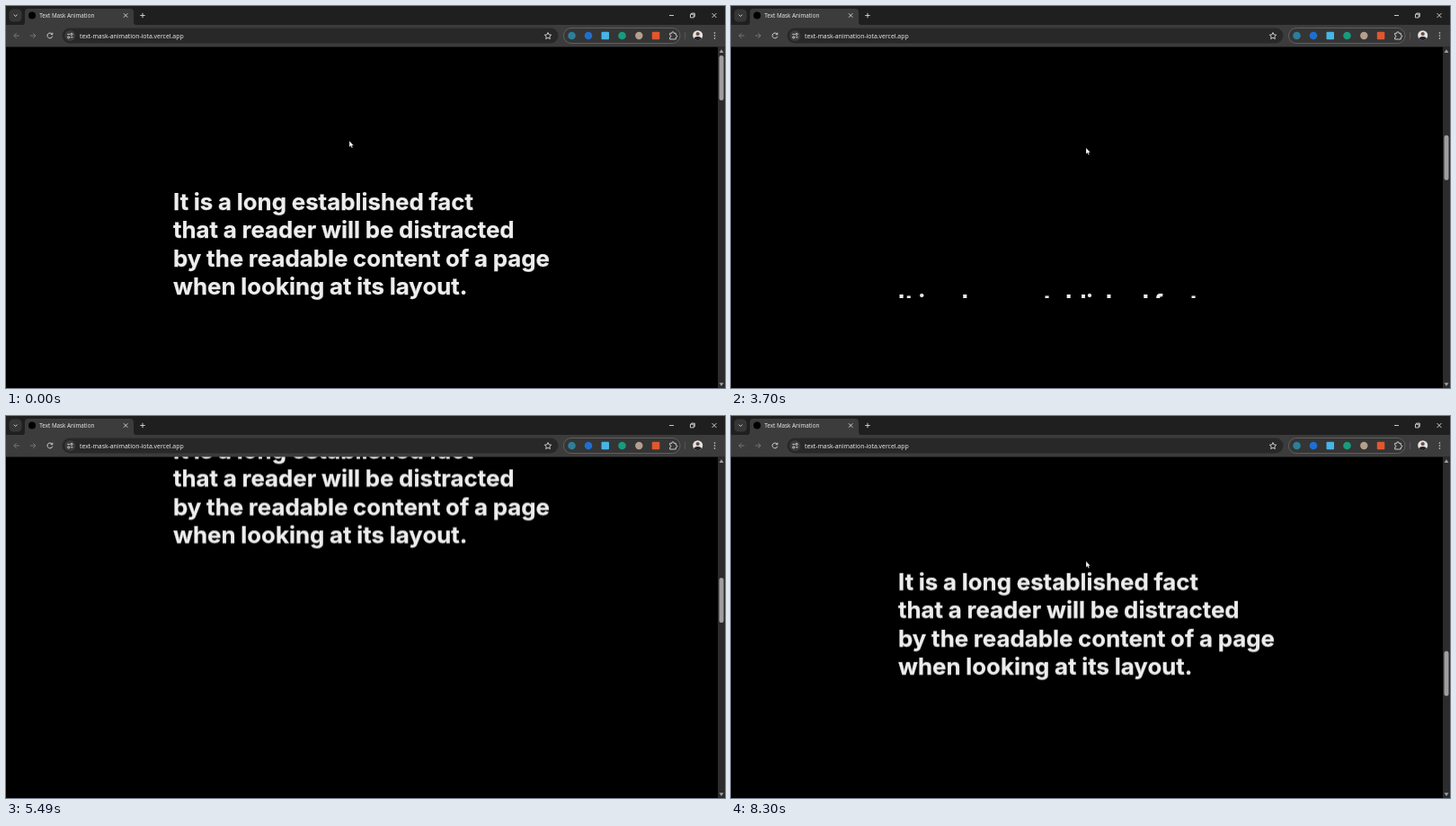
These frames come from a looping animation (800 px wide and 425 px high, 8330 ms). An HTML page:

```html
<!DOCTYPE html>
<html lang="en">
<head>
<meta charset="utf-8">
<title>Text Mask Animation</title>
<style>
  html, body { margin: 0; width: 100%; height: 100%; overflow: hidden; background: #000; }
  #stage { position: absolute; left: 0; top: 0; width: 800px; height: 425px; overflow: hidden; }
  #page { position: absolute; left: 0; top: 45px; width: 792px; height: 380px; overflow: hidden; background: #000; }
  #content { position: absolute; left: 0; top: 0; will-change: transform; }
  .phrase {
    position: absolute; left: 186.2px;
    font: 700 25.85px/31.25px Inter, sans-serif; word-spacing: -.4px;
    color: #ededed; -webkit-text-stroke: .25px #ededed; white-space: nowrap;
  }
  .line { height: 31.25px; overflow: hidden; }
  .line span { display: block; will-change: transform; }
  svg { position: absolute; left: 0; top: 0; }
  svg text { font-family: "Open Sans", "Noto Sans", sans-serif; }
  .stroke { fill: none; stroke: #dcdcdc; stroke-width: .9; }
  .dim { stroke: #7d7d7d; }
</style>
</head>
<body>
<div id="stage">
  <div id="page"><div id="content"></div></div>
  <svg width="800" height="425" viewBox="0 0 800 425">
    <!-- tab strip -->
    <rect width="800" height="22" fill="#1f1f1f"/>
    <rect x="3.5" y="3.5" width="14" height="14" rx="4.5" fill="#363636"/>
    <path class="stroke" d="M8.7 9.6l1.9 1.9 1.9-1.9"/>
    <path d="M17 21.5q4 0 4-4V7q0-4 4-4h113q4 0 4 4v10.5q0 4 4 4z" fill="#3c3c3c"/>
    <circle cx="29" cy="10.5" r="4" fill="#000"/>
    <text x="37.3" y="12.7" font-size="6.3" fill="#f0f0f0">Text Mask Animation</text>
    <path class="stroke" d="M131 8.3l4.4 4.4m0-4.4l-4.4 4.4"/>
    <path class="stroke" d="M149.3 10.5h5.4m-2.7-2.7v5.4"/>
    <path class="stroke" d="M738 10.5h5"/>
    <path class="stroke" d="M761.5 9.2h3.7v3.7h-3.7zM762.6 9V8.1h3.7v3.7h-.9"/>
    <path class="stroke" d="M785.5 8l5 5m0-5l-5 5"/>
    <!-- toolbar -->
    <rect y="21" width="800" height="24.5" fill="#3c3c3c"/>
    <path class="stroke dim" d="M14.8 33H8.8m2.8-2.8L8.8 33l2.8 2.8"/>
    <path class="stroke dim" d="M27 33h6m-2.8-2.8L33 33l-2.8 2.8"/>
    <path class="stroke" d="M51.3 31.3A2.9 2.9 0 1 0 51.7 33.7M51.8 29.7v2h-2"/>
    <rect x="62.5" y="24.5" width="552" height="17" rx="8.5" fill="#282828"/>
    <circle cx="71.3" cy="33" r="6" fill="#3c3c3c"/>
    <g class="stroke"><path d="M68.3 31.4h2.6M72 34.8h2.6"/><circle cx="73" cy="31.4" r="1.1"/><circle cx="69.7" cy="34.8" r="1.1"/></g>
    <text x="82" y="35.5" font-size="6.9" fill="#f0f0f0">text-mask-animation-iota.vercel.app</text>
    <path class="stroke" d="M603 29.5l1.1 2.4 2.6.3-1.9 1.8.5 2.6-2.3-1.3-2.3 1.3.5-2.6-1.9-1.8 2.6-.3z"/>
    <rect x="620.5" y="24.5" width="129.5" height="17" rx="8.5" fill="#353535" stroke="#6a6a6a" stroke-width=".8"/>
    <circle cx="629.5" cy="33" r="4.3" fill="#2d7f99"/>
    <circle cx="648" cy="33" r="4.3" fill="#1f6fd0"/>
    <rect x="662.5" y="28.8" width="8.5" height="8.5" rx="1" fill="#48b4e6"/>
    <circle cx="685.5" cy="33" r="4.3" fill="#179c7d"/>
    <circle cx="704.3" cy="33" r="4.2" fill="#b3a08c"/>
    <rect x="718.8" y="28.8" width="8.5" height="8.5" rx="1" fill="#e2572f"/>
    <path class="stroke" d="M738.7 30.3h2.2v-.5a1.1 1.1 0 0 1 2.2 0v.5h2.2v2.2h.4a1.1 1.1 0 0 1 0 2.2h-.4v2.3h-6.6v-2.2a1.2 1.2 0 0 0 0-2.4z"/>
    <path d="M755.5 29v8" stroke="#5c5c5c" stroke-width=".8"/>
    <clipPath id="round"><circle cx="769.7" cy="32.7" r="5.5"/></clipPath>
    <g clip-path="url(#round)">
      <rect x="764" y="27" width="12" height="12" fill="#e4e4e4"/>
      <circle cx="769.7" cy="31" r="2.1" fill="#6b4b3c"/>
      <path d="M764.5 39q.5-5 5.2-5t5.2 5z" fill="#24242a"/>
    </g>
    <g fill="#dcdcdc"><circle cx="788.5" cy="30" r=".8"/><circle cx="788.5" cy="33" r=".8"/><circle cx="788.5" cy="36" r=".8"/></g>
    <!-- scrollbar -->
    <rect x="792" y="45" width="8" height="380" fill="#2c2c2c"/>
    <path d="M793.5 52l2.5-3.8 2.5 3.8zM793.5 419.2l2.5 3.8 2.5-3.8z" fill="#9f9f9f"/>
    <rect id="thumb" x="793.5" y="55" width="5" height="50" rx="2.5" fill="#9f9f9f"/>
    <!-- pointer -->
    <path id="arrow" d="M0 0V7L1.6 5.6 2.7 8 3.8 7.5 2.8 5.2H4.9z" fill="#fff" stroke="#000" stroke-width=".3"/>
    <path id="beam" d="M-1.5 -3.5h3M0 -3.5v7M-1.5 3.5h3" fill="none" stroke="#000" stroke-width=".9"/>
  </svg>
</div>
<script>
const LOOP = 8330, PERIOD = 760, TOP = 157, LINE = 31.25, THUMB_RATIO = 7.52;
const LINES = [
  'It is a long established fact',
  'that a reader will be distracted',
  'by the readable content of a page',
  'when looking at its layout.'
];
// moment each phrase enters the view
const REVEAL = [-2000, 3610, 7255];
const DURATION = 750, STAGGER = 75;

// [ms, scroll offset]
const SCROLL = [
  [0, 0], [250, 3], [760, 97], [850, 150], [1150, 250], [1700, 270], [2030, 305],
  [2520, 451], [3000, 455], [3390, 526], [3610, 631], [3720, 675], [3885, 728],
  [4240, 764], [4270, 774], [4500, 815], [5090, 830], [5490, 939], [5940, 1149],
  [6300, 1205], [6790, 1301], [7080, 1340], [7255, 1430], [7400, 1485],
  [7550, 1546], [7640, 1553], [8330, 1553]
];
const POINTER_X = [[0, 382], [760, 387], [1500, 395], [8330, 395]];
const POINTER_Y = [[0, 150], [760, 152], [1500, 156.5], [4270, 158], [7550, 161], [8330, 161.5]];

const $ = id => document.getElementById(id);
const content = $('content'), thumb = $('thumb'), arrow = $('arrow'), beam = $('beam');

const phrases = REVEAL.map((start, n) => {
  const box = document.createElement('div');
  box.className = 'phrase';
  box.style.top = TOP + n * PERIOD + 'px';
  const spans = LINES.map(text => {
    const line = document.createElement('div');
    const span = document.createElement('span');
    line.className = 'line';
    span.textContent = text;
    line.append(span);
    box.append(line);
    return span;
  });
  content.append(box);
  return { start, spans };
});

const slope = (a, b) => (b[1] - a[1]) / (b[0] - a[0]);

// monotone cubic through the points
function curve(points, t) {
  if (t <= points[0][0]) return points[0][1];
  let i = 0;
  while (i < points.length - 2 && points[i + 1][0] <= t) i++;
  const tangent = k => {
    if (k === 0 || k === points.length - 1) return 0;
    const a = slope(points[k - 1], points[k]), b = slope(points[k], points[k + 1]);
    return a * b > 0 ? 2 * a * b / (a + b) : 0;
  };
  const [t0, y0] = points[i], [t1, y1] = points[i + 1];
  const h = t1 - t0, u = (t - t0) / h, v = 1 - u;
  return v * v * (1 + 2 * u) * y0 + u * u * (3 - 2 * u) * y1
    + h * u * v * (v * tangent(i) - u * tangent(i + 1));
}

// the browser refreshes the pointer shape slightly after the page moves
function overText(t, y) {
  const local = y - 45 + curve(SCROLL, t - 90) - TOP;
  const n = Math.floor(local / PERIOD);
  return n >= 0 && n < phrases.length && local - n * PERIOD < LINE * LINES.length;
}

function draw(t) {
  const scroll = curve(SCROLL, t);
  content.style.transform = `translateY(${-scroll}px)`;
  thumb.setAttribute('y', 55 + scroll / THUMB_RATIO);
  for (const { start, spans } of phrases) {
    spans.forEach((span, i) => {
      const p = Math.min(1, Math.max(0, (t - start - i * STAGGER) / DURATION));
      span.style.transform = `translateY(${LINE * (1 - p) ** 3}px)`;
    });
  }
  const x = curve(POINTER_X, t), y = curve(POINTER_Y, t), text = overText(t, y);
  arrow.setAttribute('transform', `translate(${x} ${y})`);
  beam.setAttribute('transform', `translate(${x} ${y})`);
  arrow.style.display = text ? 'none' : '';
  beam.style.display = text ? '' : 'none';
}

const origin = performance.now();
function tick() {
  draw((performance.now() - origin) % LOOP);
  requestAnimationFrame(tick);
}
draw(0);
requestAnimationFrame(tick);
</script>
</body>
</html>
```
